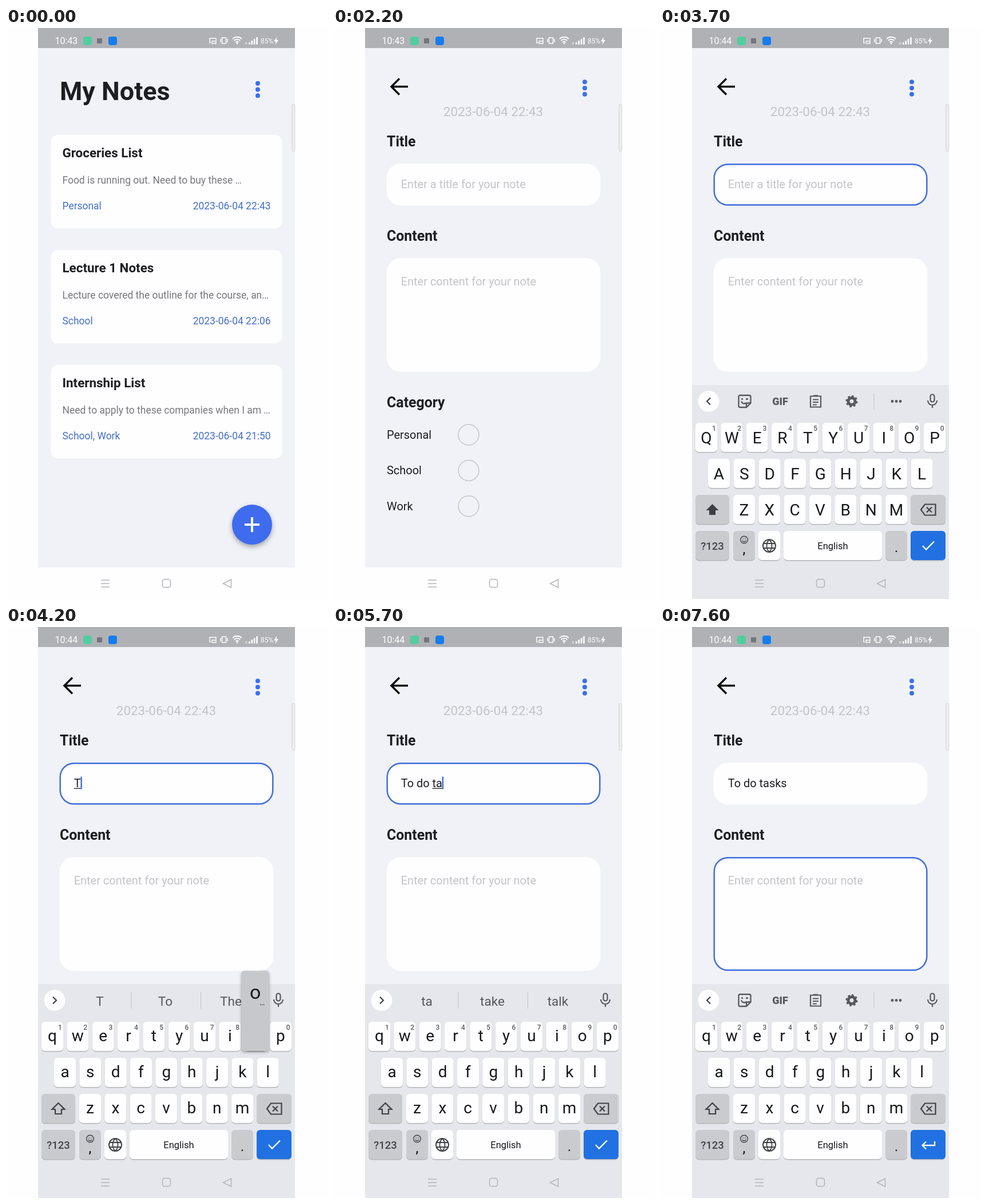
These frames come from a looping animation (561 by 998 pixels, 8 s). An HTML page with a canvas:

```html
<!DOCTYPE html>
<html lang="en">
<head>
<meta charset="utf-8">
<title>Notes app</title>
<style>
html, body { margin: 0; width: 100%; height: 100%; overflow: hidden; background: #fefdff; }
canvas { display: block; }
</style>
</head>
<body>
<canvas id="stage" width="561" height="998"></canvas>
<script>
const W = 561, H = 998, LOOP = 8000, STEP = 100;
const PAPER = '#fefdff', APP = '#f0f2f7', INK = '#1d1e22', BLUE = '#3c6cec', LINK = '#4270cb',
      HINT = '#c3c4c8', GREY = '#77787c', KEY_INK = '#17181a', ICON = '#55585d', SPECIAL = '#c9cbcf';

const stage = document.getElementById('stage').getContext('2d');
const keyboardLayer = Object.assign(document.createElement('canvas'), { width: W, height: H });
const keyboardCtx = keyboardLayer.getContext('2d');
let g = stage;

// ---------- drawing helpers ----------
// y is the middle of the capital letters
function text(str, x, y, size, color, { weight = 400, align = 'left' } = {}) {
  g.font = `${weight} ${size}px Roboto, sans-serif`;
  g.textAlign = align;
  g.fillStyle = color;
  g.fillText(str, x, y + size * 0.355);
  return g.measureText(str).width;
}
const centered = (str, x, y, size, color, weight) => text(str, x, y, size, color, { weight, align: 'center' });

function box(x, y, w, h, r, fill, stroke, line = 1) {
  g.beginPath();
  g.roundRect(x, y, w, h, r);
  if (fill) { g.fillStyle = fill; g.fill(); }
  if (stroke) { g.strokeStyle = stroke; g.lineWidth = line; g.stroke(); }
}
const disc = (x, y, r, fill, stroke, line) => box(x - r, y - r, 2 * r, 2 * r, r, fill, stroke, line);

// path coordinates are relative to (x, y)
function icon(path, x, y, color, line) {
  const p = new Path2D(path);
  g.save();
  g.translate(x, y);
  g.lineWidth = line;
  g.strokeStyle = g.fillStyle = color;
  line ? g.stroke(p) : g.fill(p);
  g.restore();
}

function shadow(color, blur, dy, draw) {
  g.save();
  g.shadowColor = color;
  g.shadowBlur = blur;
  g.shadowOffsetY = dy;
  draw();
  g.restore();
}

// ---------- system bars ----------
function statusBar(t) {
  box(56, 0, 449, 35, 0, '#b0b1b5');
  text(t < 2500 ? '10:43' : '10:44', 85.5, 22.5, 16, '#fff');
  box(135, 15, 15, 15, 4, '#52cda0');
  box(159, 18, 9, 9, 1, '#73767b');
  box(179, 15, 15, 15, 4, '#167df0');
  icon('M-3 4H-5V-4H6V0M-1 1H6V5H-1Z', 361, 22, '#fff', 1.4);
  icon('M-3.5 -5H3.5V5H-3.5ZM-6 -3V3M6 -3V3', 381, 22, '#fff', 1.5);
  icon('M-8 -2A11.5 11.5 0 0 1 8 -2M-5.3 1A7.6 7.6 0 0 1 5.3 1M-2.7 4A4 4 0 0 1 2.7 4', 404, 21, '#fff', 1.8);
  disc(404, 27, 1.4, '#fff');
  text('R', 418, 27, 6, '#fff');
  for (let i = 0; i < 4; i++) box(424 + i * 4.4, 25 - i * 3, 2.6, 4 + i * 3, 1, '#fff');
  text('85%', 445, 22.5, 12, '#fff');
  icon('M1.5 -7L-4 1H-.5L-1.5 7L4 -1.5H.5Z', 472, 22.5, '#fff');
}

function navIcons() {
  icon('M-7.5 -6H7.5M-7.5 0H7.5M-7.5 6H7.5', 173.5, 971, '#b4b5b9', 1.5);
  box(273.5, 963.5, 14, 14, 3.5, null, '#b4b5b9', 1.5);
  icon('M-7 0L7 -7V7Z', 386.5, 971, '#b4b5b9', 1.5);
}

function menuDots(y) {
  for (let i = -1; i < 2; i++) disc(440, y + i * 10.8, 4, '#3a70ee');
}

// ---------- screens ----------
const notes = [
  ['Groceries List', 'Food is running out. Need to buy these …', 'Personal', '22:43'],
  ['Lecture 1 Notes', 'Lecture covered the outline for the course, an…', 'School', '22:06'],
  ['Internship List', 'Need to apply to these companies when I am …', 'School, Work', '21:50'],
];

function listScreen(t) {
  text('My Notes', 94, 110, 44.9, INK, { weight: 700 });
  menuDots(107.5);
  notes.forEach(([title, body, tags, time], i) => {
    const y = 187 + i * 201;
    box(78.5, y, 404, 163.5, 12, PAPER);
    text(title, 98.5, y + 31, 22.4, INK, { weight: 700 });
    text(body, 98.5, y + 79, 17.45, GREY);
    text(tags, 98.5, y + 124, 17.45, LINK);
    text('2023-06-04 ' + time, 462.5, y + 124, 17.45, LINK, { align: 'right' });
  });
  g.save();
  if (t >= 200) g.globalAlpha = 0.5;
  shadow('rgba(0,0,0,.32)', 8, 4, () => disc(430, 868, 35, '#3f6cee'));
  icon('M-13 0H13M0 -13V13', 430, 868, '#fff', 4);
  g.restore();
}

function loadingScreen(t) {
  box(56, 35, 449, 908, 0, APP);
  const start = (-27 + (t - 1200) * 0.4) * Math.PI / 180;
  const sweep = (150 + 125 * Math.sin((t - 1200) / 1333 * 2 * Math.PI + 0.43)) * Math.PI / 180;
  g.beginPath();
  g.arc(280.5, 455.5, 22.5, start, start + sweep);
  g.strokeStyle = BLUE;
  g.lineWidth = 5;
  g.stroke();
  centered('Please hold on', 280, 500.5, 17.45, INK);
}

// ---------- typing ----------
const phrase = 'To do tasks';
const pressTimes = [3900, 4200, 4400, 4600, 4800, 5100, 5400, 5600, 5800, 6000, 6200];
const suggestions = [
  'T To The', 'To Too Today', 'the be do', 'd do date', 'do don\'t does', 'it the you',
  't to the', 'ta take talk', 'tas task tasks', 'task tasks task\'s', 'tasks task\'s task',
];
const TITLE_FOCUS = 2900, CONTENT_FOCUS = 7100;
const typedCount = t => pressTimes.filter(p => t >= p + STEP).length;
const pressedIndex = t => pressTimes.findIndex(p => t >= p && t < p + STEP);

function caretVisible(t) {
  const n = typedCount(t);
  const since = t >= CONTENT_FOCUS ? CONTENT_FOCUS : n ? pressTimes[n - 1] + STEP : TITLE_FOCUS;
  return t >= since && Math.floor((t - since) / 500) % 2 === 0;
}

function editorScreen(t) {
  const onTitle = t >= TITLE_FOCUS && t < CONTENT_FOCUS, onContent = t >= CONTENT_FOCUS;
  const field = (y, h, focused) => focused
    ? box(94.7, y + 1.2, 371.6, h - 2.4, 24, PAPER, '#406ddd', 2.5)
    : box(93.5, y, 374, h, 25, PAPER);
  const heading = (str, y) => text(str, 94, y, 24.9, INK, { weight: 700 });
  const caret = (x, y) => caretVisible(t) && box(x, y - 11, 2.4, 22, 0, '#3c6cdc');

  icon('M15 0H-13M0 -14L-14 0L0 14', 116, 102.5, '#0b0b0c', 3.5);
  menuDots(105);
  centered('2023-06-04 22:43', 280, 146, 22.4, HINT);

  heading('Title', 198.5);
  field(237, 73.5, onTitle);
  const typed = phrase.slice(0, typedCount(t));
  const width = typed ? text(typed, 118.7, 273, 19.95, INK) : 0;
  if (!typed) text('Enter a title for your note', 118.7, 273, 19.95, HINT);
  if (onTitle) {
    const word = typed.split(' ').pop();
    const wordWidth = g.measureText(word).width;
    if (word) box(118.7 + width - wordWidth, 281.5, wordWidth, 1.3, 0, INK);
    caret(118.5 + width, 272.5);
  }

  heading('Content', 363.5);
  field(402, 199, onContent);
  text('Enter content for your note', 118.7, 442.5, 19.95, HINT);
  if (onContent) caret(118.5, 442);

  heading('Category', 654);
  ['Personal', 'School', 'Work'].forEach((name, i) => {
    const y = 711 + i * 62.4;
    text(name, 94, y, 19.95, INK);
    disc(237, y, 18, null, '#c6c7cb', 1.5);
  });
}

// ---------- keyboard ----------
const PITCH = 44.33;
const rows = [['qwertyuiop', 81, 690], ['asdfghjkl', 103, 753], ['zxcvbnm', 147, 816]];

function key(x, y, w, fill = PAPER) {
  box(x, y + 1.5, w, 51, 6, '#b4b6bb');
  box(x, y, w, 51, 6, fill);
}

function toolbar(t) {
  const n = typedCount(t);
  const words = n && t < 7300 ? suggestions[n - 1].split(' ') : null;
  disc(85, 652.5, 18.5, PAPER);
  icon(words ? 'M-3 -6L3 0L-3 6' : 'M3 -6L-3 0L3 6', 85, 652.5, '#3f4247', 2.2);
  icon('M-3.5 -6V0A3.5 3.5 0 0 0 3.5 0V-6A3.5 3.5 0 0 0 -3.5 -6Z', 476, 650, ICON, 2.2);
  icon('M-8 -1A8 8 0 0 0 8 -1M0 7V12', 476, 652, ICON, 2.2);
  if (words) {
    words.forEach((word, i) => centered(word, 164 + i * 114.5, 653.5, 22.6, ICON));
    for (const x of [218.5, 340]) box(x, 638, 1, 29, 0, '#bfc1c6');
    return;
  }
  icon('M-10.5 -8Q-10.5 -10.5 -8 -10.5H8Q10.5 -10.5 10.5 -8V3L3 10.5H-8Q-10.5 10.5 -10.5 8ZM3 10V3H10M-6 0Q-3 6 2 3M-6 -4H-3M2 -4H6', 148, 652.5, ICON, 2.3);
  centered('GIF', 210, 652.5, 18, ICON, 900);
  icon('M-9 -9H9V10H-9ZM-4 -10H4M-5 -3H5M-5 1.5H5M-5 6H2', 272, 652.5, ICON, 2.2);
  disc(335, 652.5, 6, null, ICON, 5);
  g.save();
  g.setLineDash([3.53, 3.53]);
  disc(335, 652.5, 9, null, ICON, 3);
  g.restore();
  box(373.5, 638, 1, 28, 0, '#bfc1c6');
  for (let i = -1; i < 2; i++) disc(413 + i * 7, 652.5, 2.4, ICON);
}

function popup(t) {
  const i = pressedIndex(t);
  const letter = phrase[i];
  // the quick tap on "k" shows no preview
  if (i < 0 || letter === ' ' || letter === 'k') return;
  const [letters, x0, y] = rows.find(([r]) => r.includes(letter.toLowerCase()));
  const x = x0 + letters.indexOf(letter.toLowerCase()) * PITCH;
  shadow('rgba(0,0,0,.35)', 5, 2, () => box(x - 24, y - 89, 48, 140, 5, '#c7c8cc'));
  centered(letter, x, y - 52, 34, KEY_INK);
  centered('…', x + 12, y - 34, 14, KEY_INK);
}

function keyboard(t) {
  const upper = t >= 3300 && !typedCount(t);
  box(56, 624, 449, 374, 0, '#e5e7ec');
  toolbar(t);
  rows.forEach(([letters, x0, y], row) => [...letters].forEach((ch, i) => {
    const x = x0 + i * PITCH;
    key(x - 19, y, 38);
    centered(upper ? ch.toUpperCase() : ch, x, y + (upper ? 26.5 : 24.5), 28, KEY_INK);
    if (!row) centered((i + 1) % 10, x + 13.3, y + 9.5, 12, '#5d6065', 500);
  }));
  key(62, 816, 59, SPECIAL);
  const arrow = 'M0 -10L11 1H5.5V9H-5.5V1H-11Z';
  icon(arrow, 91.5, 842, '#3c3f44', upper ? 0 : 2.2);
  key(438, 816, 61, SPECIAL);
  icon('M-13 0L-6 -9.5H12.5V9.5H-6ZM-3 -4.5L6 4.5M6 -4.5L-3 4.5', 469, 842, '#3f4247', 2.2);

  key(62, 879, 59, SPECIAL);
  centered('?123', 91.5, 905, 18.5, '#3f4247', 500);
  key(128, 879, 38, SPECIAL);
  disc(147, 894.5, 6.3, null, '#3f4247', 1.4);
  icon('M-3.3 1Q0 5 3.3 1M-2.6 -2H-1.2M1.2 -2H2.6', 147, 895, '#3f4247', 1.3);
  centered(',', 147, 911, 20, KEY_INK, 700);
  key(172, 879, 38);
  disc(191, 905, 11, null, '#3f4247', 2);
  icon('M0 -11C-6 -5 -6 5 0 11C6 5 6 -5 0 -11M-10 -4H10M-10 4H10', 191, 905, '#3f4247', 1.8);
  key(216, 879, 172, phrase[pressedIndex(t)] === ' ' ? SPECIAL : PAPER);
  centered('English', 302, 905.5, 16.5, KEY_INK);
  key(394, 879, 38, SPECIAL);
  centered('.', 413, 909, 20, KEY_INK, 500);
  key(438, 879, 61, '#2171e2');
  icon(t < 7300 ? 'M-10 0L-4 6.5L10 -7.5' : 'M11 -6V1H-10M-4 -5.5L-10.5 1L-4 7.5', 469, 905, '#fff', 2.3);
  popup(t);
}

// ---------- timeline ----------
const clamp = v => Math.max(0, Math.min(1, v));

function draw(t) {
  g = stage;
  box(0, 0, W, H, 0, PAPER);
  box(56, 0, 449, 943, 0, APP);
  if (t < 1600) {
    if (t < 500) listScreen(t);
    g.globalAlpha = clamp((t - 200) / 300);
    loadingScreen(t);
    g.globalAlpha = 1;
  } else {
    editorScreen(t);
  }
  statusBar(t);
  box(499.8, 133.5, 5, 82, 2, '#ededf1', '#d3d4d9');
  box(56, 943, 449, 55, 0, PAPER);

  const shown = clamp((t - 3000) / 325);
  if (shown) {
    g = keyboardCtx;
    g.clearRect(0, 0, W, H);
    keyboard(t);
    g = stage;
    g.globalAlpha = clamp(shown * 2);
    g.drawImage(keyboardLayer, 0, 200 * (1 - shown) ** 2);
    g.globalAlpha = 1;
  }
  navIcons();
}

function tick() {
  const t = performance.now() % LOOP;
  draw(Math.floor(t / STEP) * STEP);
  requestAnimationFrame(tick);
}
tick();
</script>
</body>
</html>
```
